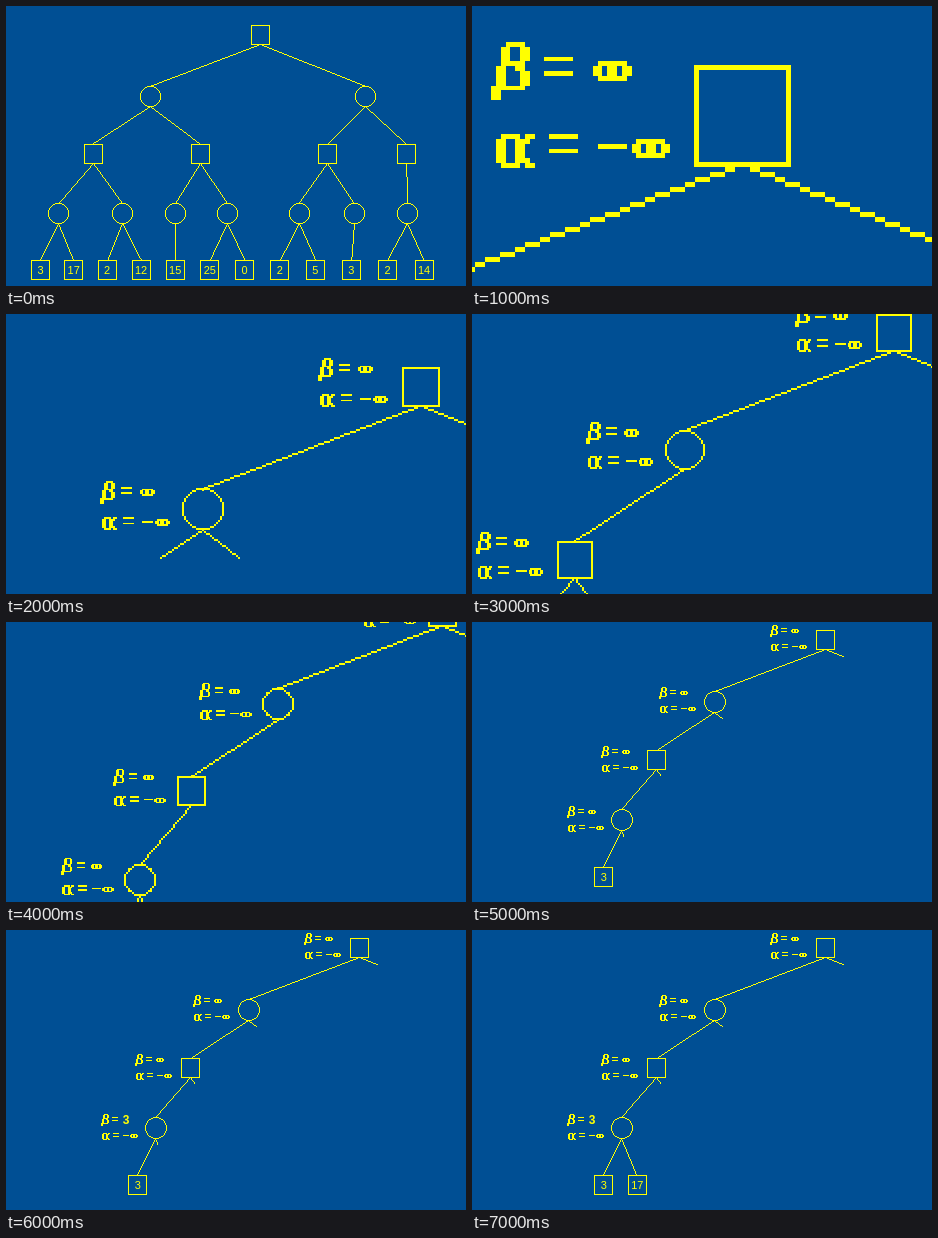
Recreate the animation shown at these times as an HTML page with a canvas. Size 460 px wide and 280 px high, loop 8000 ms.

```html
<!DOCTYPE html>
<html lang="en">
<head>
<meta charset="utf-8">
<title>Alpha-beta search tree</title>
<style>
  html, body { margin: 0; width: 100%; height: 100%; overflow: hidden; background: #004f94; }
  canvas { display: block; }
</style>
</head>
<body>
<canvas id="stage" width="460" height="280" role="img" aria-label="Alpha-beta search tree"></canvas>
<script>
const ctx = document.getElementById('stage').getContext('2d');
const YELLOW = '#ffff00', BLUE = '#004f94';
const STEP = 1000, STEPS = 8;

// The game tree: inner nodes have an x, bare numbers are leaves.
const LEVELS = [28.5, 90, 147.5, 207, 263.5];
const node = (x, ...kids) => ({ x, kids });
const root = node(254,
  node(144.5,
    node(87, node(52.5, 3, 17), node(116, 2, 12)),
    node(194, node(169, 15), node(221, 25, 0))),
  node(359,
    node(321.5, node(293, 2, 5), node(348, 3)),
    node(400, node(401.5, 2, 14))));

// Leaves follow one another with slowly growing gaps.
let leaves = 0;
(function place(n, depth) {
  n.depth = depth;
  n.y = LEVELS[depth];
  n.kids = n.kids.map(kid => {
    if (typeof kid !== 'number') return place(kid, depth + 1);
    const i = leaves++;
    return { x: 34.5 + 33 * i + .17 * i * i, y: LEVELS[4], depth: 4, value: kid, kids: [] };
  });
  return n;
})(root, 0);

// Camera: zoom and the place of the root on the stage.
const camera = (zoom, x, y) => ({ zoom, x, y });
const OVERVIEW = camera(1, root.x, root.y);
const SHOTS = [
  camera(5.1, 270.5, 110), camera(1.99, 414.5, 73), camera(1.91, 422, 18.5),
  camera(1.5, 436, -10), camera(1.01, 353.5, 18)
];
let cam, pen;

function look(shot) {
  cam = shot;
  pen = Math.round(shot.zoom);
}

const sx = n => cam.x + (n.x - root.x) * cam.zoom;
const sy = n => cam.y + (n.y - root.y) * cam.zoom;
const isRound = n => n.depth % 2 === 1;
const half = n => (isRound(n) ? 10.2 : 9.5) * cam.zoom;

function text(str, x, y, font = '11px') {
  ctx.font = font + ' "Liberation Sans", Arial, sans-serif';
  ctx.textAlign = 'center';
  ctx.fillText(str, x, y);
}

function square(cx, cy) {
  const w = Math.round(19 * cam.zoom), h = Math.round(20 * cam.zoom);
  const x = Math.round(cx - w / 2), y = Math.round(cy - h / 2);
  ctx.fillRect(x, y, w, pen);
  ctx.fillRect(x, y + h - pen, w, pen);
  ctx.fillRect(x, y, pen, h);
  ctx.fillRect(x + w - pen, y, pen, h);
}

function circle(cx, cy) {
  const n = Math.round(21.3 * cam.zoom / pen), r = (n - 1) / 2;
  const left = Math.round(cx - n * pen / 2), top = Math.round(cy - n * pen / 2);
  const dot = (a, b) => ctx.fillRect(left + (a + r) * pen, top + (b + r) * pen, pen, pen);
  for (let a = -r; a <= r; a++) {
    if (Math.abs(a) > r * .74) continue;
    const b = r - Math.round(r - Math.sqrt(r * r - a * a));
    dot(a, b); dot(a, -b); dot(b, a); dot(-b, a);
  }
}

function drawNode(n) {
  (isRound(n) ? circle : square)(sx(n), sy(n));
  if ('value' in n) text(n.value, sx(n), sy(n) + 4);
}

// Stepped line from a parent towards a child; part is the share drawn.
function edge(from, to, part = 1) {
  const x = sx(from), y = sy(from) + half(from);
  const dx = (sx(to) - x) / pen, dy = (sy(to) - half(to) - y) / pen;
  const left = Math.round(x - pen / 2), top = Math.round(y - pen / 2);
  const n = Math.round(Math.max(Math.abs(dx), Math.abs(dy)));
  for (let i = 0; i <= n * part; i++) {
    ctx.fillRect(left + Math.round(dx * i / n) * pen, top + Math.round(dy * i / n) * pen, pen, pen);
  }
}

// Pen strokes of the bold symbols, two cells wide.
const SYMBOLS = {
  beta: ['0,11 0,9 1,8 1,5 2,4 2,1 3,0 5,0 6,1 6,3 5,4 4,4 6,6 6,8 5,9 2,9'],
  alpha: ['6,0 4,2 4,4 6,6', '4,5 3,6 1,6 0,5 0,1 1,0 3,0 4,1'],
  infinity: ['1,0 5,0', '1,3 5,3', '0,1 0,2', '3,1 3,2', '6,1 6,2'],
  equals: ['0,0 4,0', '0,3 4,3'],
  minus: ['0,0 4,0']
};

// Alpha and beta bounds to the left of a node.
function bounds(n, beta) {
  const size = Math.max(1, .95 * cam.zoom);
  const left = Math.round(sx(n) - 48 * cam.zoom - 7);
  const top = Math.round(sy(n) - 14.5 * cam.zoom);

  function cell(x, y) {
    const x0 = Math.round(left + x * size), y0 = Math.round(top + y * size);
    ctx.fillRect(x0, y0,
      Math.round(left + (x + 2) * size) - x0, Math.round(top + (y + 1) * size) - y0);
  }

  function symbol(name, x, y) {
    for (const stroke of SYMBOLS[name]) {
      const points = stroke.split(' ').map(p => p.split(',').map(Number));
      points.reduce(([ax, ay], [bx, by]) => {
        const steps = Math.max(Math.abs(bx - ax), Math.abs(by - ay));
        for (let i = 0; i <= steps; i++) {
          cell(x + Math.round(ax + (bx - ax) * i / steps), y + Math.round(ay + (by - ay) * i / steps));
        }
        return [bx, by];
      });
    }
  }

  symbol('beta', 0, 0);
  symbol('equals', 11, 3);
  if (beta) text(beta, left + 25, top + 10, 'bold 12px');
  else symbol('infinity', 21, 4);
  symbol('alpha', 1, 19);
  symbol('equals', 12, 19);
  symbol('minus', 22, 21);
  symbol('infinity', 29, 20);
}

function overview(n) {
  drawNode(n);
  for (const kid of n.kids) {
    edge(n, kid);
    overview(kid);
  }
}

// Walks down the leftmost branch, one level deeper per step.
function descend(step) {
  const deepest = Math.min(step, SHOTS.length) - 1;
  const atLeaf = deepest === 4;
  look(SHOTS[deepest]);
  const reach = Math.max(.37, cam.zoom / 10);

  for (let n = root; n && n.depth <= deepest; n = n.kids[0]) {
    drawNode(n);
    if (!n.kids.length) break;
    const [first, second] = n.kids;
    const newest = n.depth === deepest, isParent = n.depth === 3;
    bounds(n, isParent && step >= 6 ? '3' : '');
    edge(n, first, newest ? reach : 1);
    if (isParent && step === 7) {
      edge(n, second);
      drawNode(second);
    } else if (atLeaf) {
      edge(n, second, .17);
    } else if (newest || n === root) {
      edge(n, second, reach);
    }
  }
}

let shown = -1;
function render(time) {
  const step = Math.floor(time / STEP) % STEPS;
  if (step === shown) return;
  shown = step;
  ctx.fillStyle = BLUE;
  ctx.fillRect(0, 0, 460, 280);
  ctx.fillStyle = YELLOW;
  if (step) {
    descend(step);
  } else {
    look(OVERVIEW);
    overview(root);
  }
}

const start = performance.now();
function tick() {
  render(performance.now() - start);
  requestAnimationFrame(tick);
}
tick();
</script>
</body>
</html>
```
